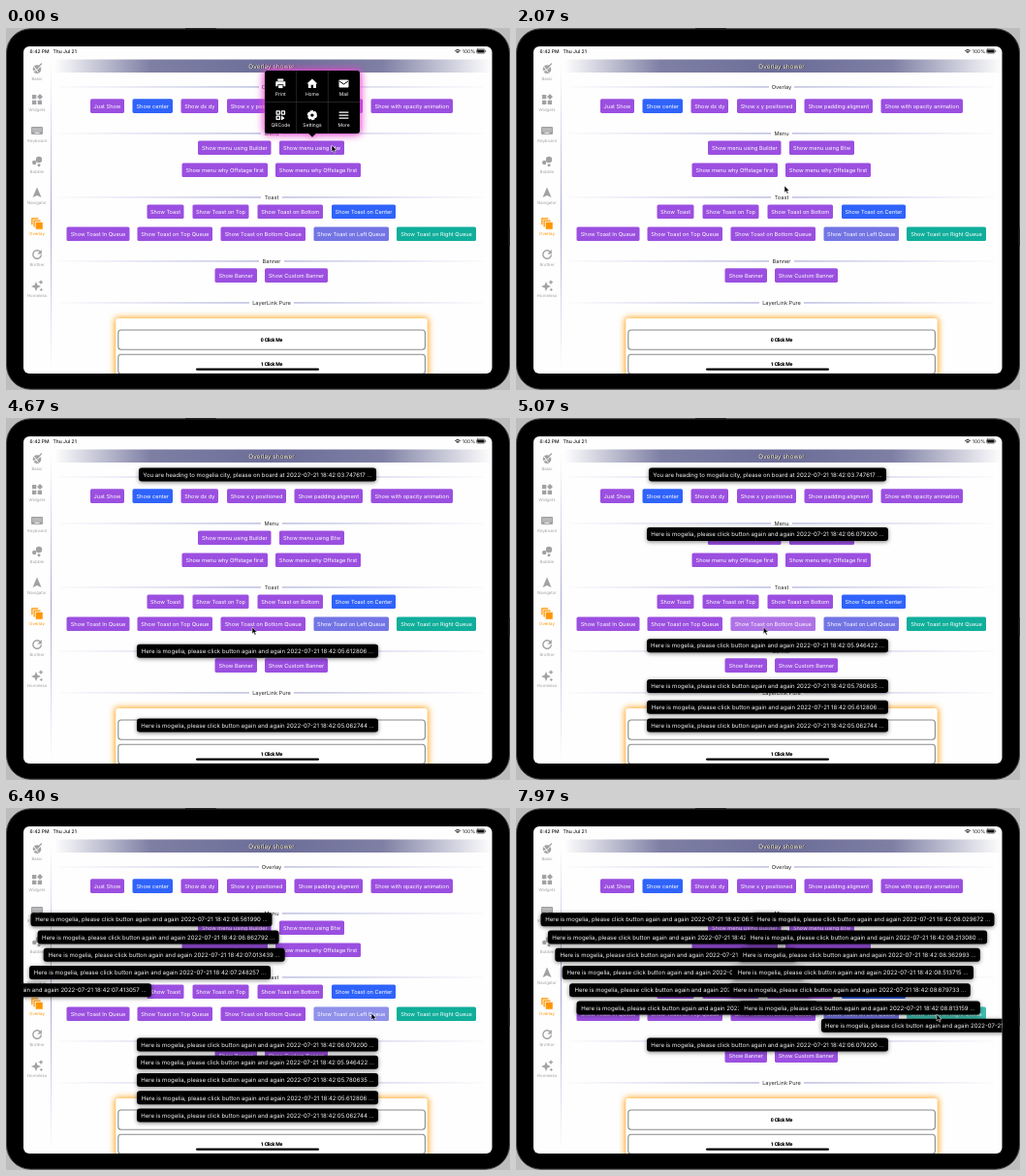
Write an HTML page that moves like this. It is 520 px wide and 374 px high and loops after 8000 ms.

```html
<!DOCTYPE html>
<html lang="en">
<head>
<meta charset="utf-8">
<title>Overlay shower</title>
<style>
html, body { margin: 0; width: 100%; height: 100%; overflow: hidden; background: #bdbdbd; }
svg { display: block; width: 520px; height: 374px; }
text { font-family: Inter, "Open Sans", sans-serif; text-anchor: middle; text-rendering: geometricPrecision; }
.line { fill: none; stroke: currentColor; stroke-linecap: round; stroke-linejoin: round; }
.card { font: 900 5.2px Roboto, sans-serif; letter-spacing: -.25px; }
.toast { filter: drop-shadow(0 1px 2px rgba(0,0,0,.5)); }
.popup { filter: drop-shadow(0 0 4px #f04cc8) drop-shadow(0 0 2px rgba(213,43,216,.5)); animation: dismiss 8s linear infinite; }
@keyframes dismiss { 0%, 12.5% { opacity: 1 } 15%, 99.99% { opacity: 0 } 100% { opacity: 1 } }
</style>
</head>
<body>
<svg id="stage" viewBox="0 0 520 374">
  <defs>
    <clipPath id="screen"><rect x="18" y="19" width="483.5" height="338" rx="6"/></clipPath>
    <linearGradient id="bar">
      <stop offset="0" stop-color="#70719a" stop-opacity="0"/>
      <stop offset=".22" stop-color="#70719a" stop-opacity=".9"/>
      <stop offset=".5" stop-color="#6c6d98"/>
      <stop offset=".75" stop-color="#70719a" stop-opacity=".9"/>
      <stop offset="1" stop-color="#70719a" stop-opacity="0"/>
    </linearGradient>
    <linearGradient id="toRight"><stop stop-color="#8f93cc" stop-opacity=".05"/><stop offset="1" stop-color="#8f93cc"/></linearGradient>
    <linearGradient id="toLeft"><stop stop-color="#8f93cc"/><stop offset="1" stop-color="#8f93cc" stop-opacity=".05"/></linearGradient>
    <linearGradient id="side" x2="0" y2="1">
      <stop stop-color="#9a9dcc" stop-opacity="0"/><stop offset=".5" stop-color="#9a9dcc"/><stop offset="1" stop-color="#9a9dcc" stop-opacity="0"/>
    </linearGradient>
    <filter id="glow" x="-10%" y="-30%" width="120%" height="160%"><feGaussianBlur stdDeviation="3.2"/></filter>
  </defs>
  <rect x=".5" y=".8" width="519" height="372.4" rx="25" fill="#000" stroke="#444" stroke-width="1"/>
  <rect x="185" y="0" width="32" height="1.2" fill="#222"/>
  <rect x="518.5" y="206" width="1.5" height="19" fill="#222"/>
  <g clip-path="url(#screen)">
    <rect x="18" y="19" width="484" height="338" fill="#fefefe"/>
    <g id="page"></g>
    <g id="toasts"></g>
    <g id="menu" class="popup"></g>
    <rect x="196" y="351.4" width="127" height="2.4" rx="1.2"/>
  </g>
  <path id="cursor" d="M0 0V7L1.6 5.6 2.8 8.2 4 7.6 2.8 5.1H5Z" stroke="#fff" stroke-width=".5"/>
</svg>
<script>
const LOOP = 8000, CLOCK_SHIFT = 1064, TOAST_LIFE = 3015, SLIDE = 88;
const PURPLE = '#9b4fe0', BLUE = '#2f63fa', INDIGO = '#7375e5', TEAL = '#10ae9b';
const $ = id => document.getElementById(id);
const page = $('page'), menu = $('menu'), cursor = $('cursor');

function add(parent, tag, attrs, content) {
  const el = document.createElementNS('http://www.w3.org/2000/svg', tag);
  for (const key in attrs) el.setAttribute(key, attrs[key]);
  if (content) el.textContent = content;
  parent.appendChild(el);
  return el;
}
const rect = (parent, x, y, width, height, attrs) => add(parent, 'rect', { x, y, width, height, ...attrs });
const label = (parent, x, y, size, fill, content, attrs) =>
  add(parent, 'text', { x, y: y + size * .36, 'font-size': size, fill, ...attrs }, content);

function icon(parent, x, y, color, shapes) {
  const g = add(parent, 'g', { transform: `translate(${x} ${y})`, fill: color, color });
  g.innerHTML = shapes;
}

// Status bar
label(page, 24.5, 24, 5, '#111', '6:42 PM', { style: 'text-anchor:start', 'font-weight': 500 });
label(page, 48.5, 24, 5, '#111', 'Thu Jul 21', { style: 'text-anchor:start', 'font-weight': 500 });
label(page, 477.5, 24, 5, '#111', '100%');
icon(page, 466, 24, '#111', `<path class="line" stroke-width=".9" d="M-2.5 -.7Q0 -2.8 2.5 -.7M-1.4 .6Q0 -.5 1.4 .6"/><circle cy="1.5" r=".6"/>`);
icon(page, 490, 24, '#111', `<rect class="line" stroke-width=".5" x="-4.5" y="-2.1" width="8.6" height="4.2" rx="1.2"/>
  <rect x="-3.8" y="-1.4" width="7.2" height="2.8" rx=".7"/><rect x="4.6" y="-.7" width=".6" height="1.4"/>`);

// Sidebar
const sidebar = [
  ['Basic', `<circle r="4.3" cy=".6"/><path class="line" stroke="#fff" style="stroke:#fff" stroke-width="1" d="M-4 2.5Q1 2 3.5 -2.5M-3 -2L1 3.5"/><path class="line" stroke-width="1.3" d="M2.5 -3L4.5 -5"/>`],
  ['Widgets', `<path d="M-5 -5h4.3v4.3h-4.3zM-5 .7h4.3v4.3h-4.3zM.7 .7h4.3v4.3h-4.3zM3 -6L6 -3 3 0 0 -3z"/>`],
  ['Keyboard', `<rect x="-6" y="-4" width="12" height="8" rx="1"/><path stroke="#fff" stroke-dasharray="1 1" d="M-4.5 -1.8H5M-4.5 .2H5"/><path stroke="#fff" d="M-2.5 2.4H2.5"/>`],
  ['Bubble', `<circle cx="-2.8" cy="1" r="2.2"/><circle cx="2" cy="-2" r="3.2"/><circle cx="2" cy="3.8" r="1.5"/>`],
  ['Navigator', `<path d="M0 -5.5L4.5 5 0 3 -4.5 5z"/>`],
  ['Overlay', `<g stroke="#fff" stroke-width=".9"><rect x="-6.2" y="-6.2" width="8" height="8"/><rect x="-4" y="-4" width="8" height="8"/><rect x="-1.8" y="-1.8" width="8" height="8"/></g>`],
  ['Brother', `<path class="line" stroke-width="1.4" d="M3.4 -2.8A4.3 4.3 0 1 0 4.3 1"/><path d="M4.8 -5v4.5h-4.5z"/>`],
  ['Homeless', `<path d="M-1 -4L.4 -.4 4 1 .4 2.4 -1 6 -2.4 2.4 -6 1 -2.4 -.4zM4 -6l.8 1.8 1.8 .8 -1.8 .8 -.8 1.8 -.8 -1.8 -1.8 -.8 1.8 -.8zM4.3 2.5l.6 1.3 1.3 .6 -1.3 .6 -.6 1.3 -.6 -1.3 -1.3 -.6 1.3 -.6z"/>`]
];
sidebar.forEach(([name, shapes], i) => {
  const color = name === 'Overlay' ? '#ff9500' : '#a2a2a5', y = 42 + 32 * i;
  icon(page, 32, y, color, shapes);
  label(page, 32, y + 10, 4.35, color, name);
});
rect(page, 46, 36, .9, 318, { fill: 'url(#side)' });

// Header and section titles
rect(page, 50, 32.5, 451, 13.5, { fill: 'url(#bar)' });
label(page, 274.8, 40, 6.45, '#111', 'Overlay shower');
label(page, 274, 39.3, 6.45, '#fff8e0', 'Overlay shower');
[['Overlay', 61, 10], ['Menu', 109, 8], ['Toast', 175, 8], ['Banner', 241, 10], ['LayerLink Pure', 284, 20]].forEach(([name, y, half]) => {
  rect(page, 55, y - .5, 216 - half, .9, { fill: 'url(#toRight)' });
  rect(page, 277 + half, y - .5, 216 - half, .9, { fill: 'url(#toLeft)' });
  label(page, 274, y, 5.65, '#2b2b2b', name);
});

// Buttons
const flashes = {};
function button(y, x1, x2, name, fill = PURPLE) {
  const box = [x1, y - 7.3, x2 - x1, 14.6];
  rect(page, ...box, { rx: 1.6, fill });
  flashes[name] = rect(page, ...box, { rx: 1.6, fill: '#fff', opacity: 0 });
  label(page, (x1 + x2) / 2, y, 5.65, '#fff', name);
}
button(80.6, 87, 122, 'Just Show');
button(80.6, 130.5, 172, 'Show center', BLUE);
button(80.6, 180.5, 219, 'Show dx dy');
button(80.6, 228, 289, 'Show x y positioned');
button(80.6, 297.5, 368, 'Show padding aligment');
button(80.6, 376.5, 461, 'Show with opacity animation');
button(123.8, 198, 273.5, 'Show menu using Builder');
button(123.8, 282, 349, 'Show menu using Btw');
button(146.8, 181.5, 270, 'Show menu why Offstage first');
button(146.8, 278, 366, 'Show menu why Offstage first');
button(189.7, 145.5, 183.5, 'Show Toast');
button(189.7, 192.5, 250.5, 'Show Toast on Top');
button(189.7, 259.5, 327, 'Show Toast on Bottom');
button(189.7, 336, 402, 'Show Toast on Center', BLUE);
button(212.8, 62.5, 127.5, 'Show Toast In Queue');
button(212.8, 135.5, 213, 'Show Toast on Top Queue');
button(212.8, 221.5, 309, 'Show Toast on Bottom Queue');
button(212.8, 317.5, 395, 'Show Toast on Left Queue', INDIGO);
button(212.8, 403, 485, 'Show Toast on Right Queue', TEAL);
button(255.6, 215.5, 259, 'Show Banner');
button(255.6, 267, 332, 'Show Custom Banner');

// Glowing card
rect(page, 112, 299, 324, 82, { rx: 4, fill: '#ffa51f', filter: 'url(#glow)' });
rect(page, 113.3, 300, 321.4, 80, { rx: 2.5, fill: '#fff' });
[0, 1].forEach(i => {
  rect(page, 115.8, 312 + 25.2 * i, 316.6, 20.2, { rx: 3, fill: '#fff', stroke: '#8a8a8a', 'stroke-width': 1.1 });
  add(page, 'text', { x: 274, y: 324 + 25.2 * i, class: 'card' }, `${i} Click Me`);
});

// Popup menu
rect(menu, 267, 44, 98, 65, { rx: 3 });
add(menu, 'path', { d: 'M312 108.8H320L316 112.8Z' });
add(menu, 'path', { d: 'M299.7 44V109M332.3 44V109M267 76.5H365', stroke: '#444', 'stroke-width': .5 });
const menuItems = [
  ['Print', `<path d="M-3 -5h6v2.2h-6zM-5 -2.2h10v5h-2v-2h-6v2h-2z"/><rect x="-2.2" y="1.6" width="4.4" height="3"/>`],
  ['Home', `<path d="M0 -5L5.5 0H4V4.5H1.2V1.2H-1.2V4.5H-4V0H-5.5z"/>`],
  ['Mail', `<rect x="-5" y="-4" width="10" height="8" rx="1"/><path d="M-4.5 -2.5L0 .5 4.5 -2.5" fill="none" stroke="#000"/>`],
  ['QRCode', `<path class="line" stroke-width="1.2" d="M-4.2 -4.2h3.2v3.2h-3.2zM1 -4.2h3.2v3.2h-3.2zM-4.2 1h3.2v3.2h-3.2z"/><path d="M.6 .6h1.6v1.6h1.6v1.6h-1.6v1.2h-1.6z"/>`],
  ['Settings', `<circle r="4.2"/><circle class="line" r="4.3" stroke-width="1.6" stroke-dasharray="2.2 2.3"/><circle r="1.7" fill="#000"/>`],
  ['More', `<path class="line" stroke-width="1.2" d="M-4.5 -3H4.5M-4.5 0H4.5M-4.5 3H4.5"/>`]
];
menuItems.forEach(([name, shapes], i) => {
  const x = 283.3 + 32.6 * (i % 3), y = 57.5 + 32.6 * (i > 2);
  icon(menu, x, y, '#fff', shapes);
  label(menu, x, y + 10.3, 5, '#fff', name);
});

// Toasts: wall-clock seconds of each tap, grouped by queue
const HERE = 'Here is mogelia, please click button again and again';
const queues = [
  { name: 'Top', times: ['03.747617'], text: 'You are heading to mogelia city, please on board at',
    width: 245, place: () => [259.5, 58.5], from: [0, -235] },
  { name: 'Bottom', times: ['05.062744', '05.612806', '05.780635', '05.946422', '06.079200'],
    place: i => [259.5, 317.6 - 18.25 * i], from: [0, -235] },
  { name: 'Left', times: ['06.561990', '06.862792', '07.013439', '07.248257', '07.413057', '07.563387'],
    place: i => [150 + 7.4 * i, 115.2 + 18.25 * i], from: [-278, 0] },
  { name: 'Right', times: ['08.029672', '08.213080', '08.362993', '08.513715', '08.679733', '08.813159', '08.957204'],
    place: i => [369 - 7.4 * i, 115.2 + 18.25 * i], from: [278, 0] }
];
const toasts = queues.flatMap(({ name, times, text = HERE, width = 249, place, from }) => times.map((time, i) => {
  const el = add($('toasts'), 'g', { class: 'toast' });
  rect(el, -width / 2, -7, width, 14, { rx: 3 });
  label(el, 0, 0, 6.05, '#f4f4f4', `${text} 2022-07-21 18:42:${time} ...`);
  return { el, from, home: place(i), start: time * 1000 - CLOCK_SHIFT, button: `Show Toast on ${name} Queue` };
}));

const path = [
  [0, 336, 121], [900, 336, 121], [1900, 277, 163], [2150, 277, 163], [2600, 174, 213], [3100, 174, 213],
  [3850, 222, 215], [4150, 222, 215], [4500, 254, 216], [5050, 254, 216], [5400, 377, 212],
  [6520, 377, 212], [6880, 433, 213], [LOOP, 434, 213]
];
function cursorAt(t) {
  const i = path.findIndex(p => p[0] > t), [t0, x0, y0] = path[i - 1], [t1, x1, y1] = path[i];
  const k = (t - t0) / (t1 - t0), ease = k * k * (3 - 2 * k);
  return [x0 + (x1 - x0) * ease, y0 + (y1 - y0) * ease];
}

// The press highlight appears shortly after a tap, holds and fades
const clamp = v => Math.min(1, Math.max(0, v));
const highlight = age => .2 * clamp((age - 120) / 50) * clamp((400 - age) / 150);

function draw(t) {
  const lit = {};
  for (const { el, from, home, start, button } of toasts) {
    const age = t - start, shown = age >= 0 && age < TOAST_LIFE;
    el.style.display = shown ? '' : 'none';
    lit[button] = Math.max(lit[button] || 0, highlight(age));
    if (!shown) continue;
    const left = Math.exp(-age / SLIDE);
    el.setAttribute('transform', `translate(${home[0] + from[0] * left} ${home[1] + from[1] * left})`);
  }
  for (const name in lit) flashes[name].setAttribute('opacity', lit[name]);
  cursor.setAttribute('transform', `translate(${cursorAt(t)})`);
}

const popupRun = menu.getAnimations()[0];
function tick(now) {
  const t = now % LOOP;
  if (popupRun) popupRun.currentTime = t;
  draw(t);
  requestAnimationFrame(tick);
}
draw(0);
requestAnimationFrame(tick);
</script>
</body>
</html>
```
